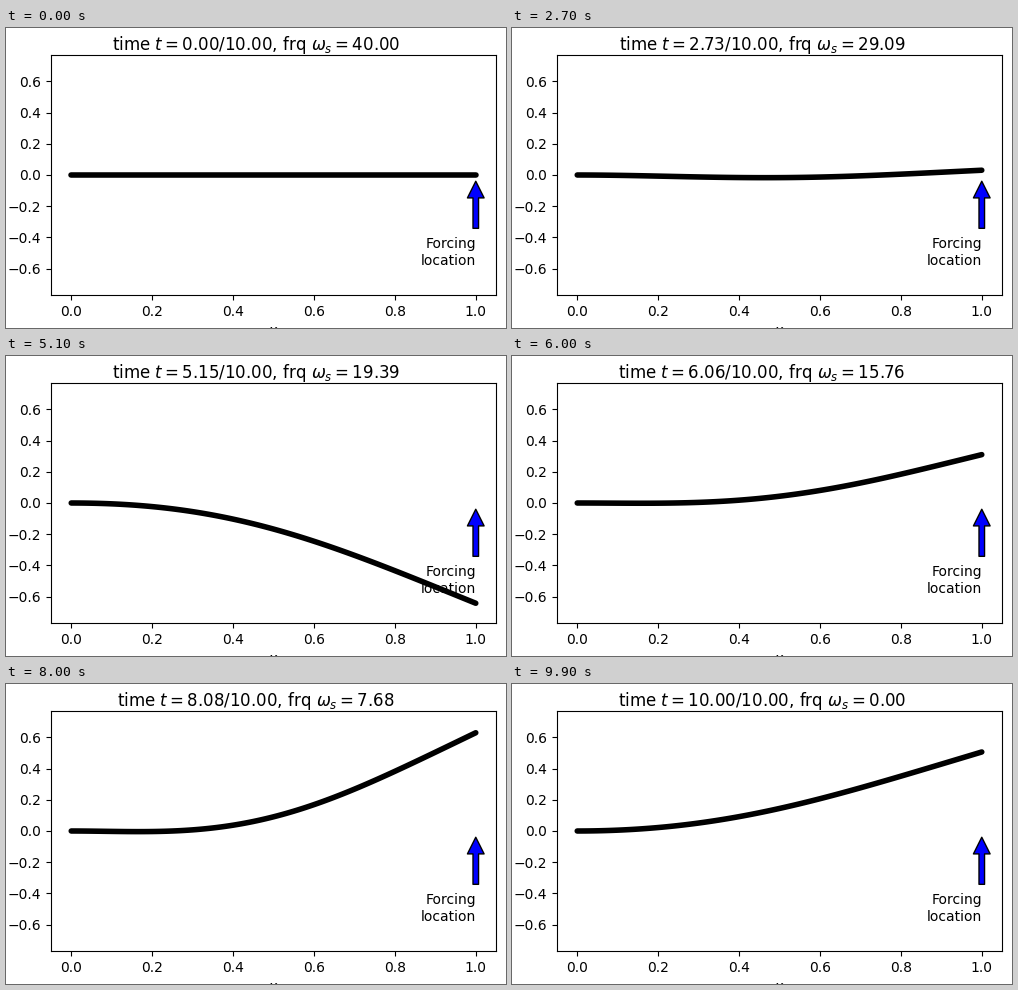
Animation, 500 px wide and 300 px high, one loop 10 s. Source, as a matplotlib script:

```python
"""Cantilever beam driven at its free end by a force of falling frequency."""
import numpy as np
import matplotlib.pyplot as plt
from matplotlib.animation import FuncAnimation

FRAMES, T = 100, 10.0
OMEGA_START = 40.0
SUBSTEPS = 400
# Roots of cos(b) cosh(b) = -1 for the clamped-free beam
BETAS = (1.8751040687, 4.6940911330, 7.8547574382, 10.9955407349, 14.1371683910)


def sweep(t):
    return OMEGA_START * (1 - t / T)


def mode_shape(b, x):
    """Clamped-free mode, scaled to 1 at the tip."""
    ratio = (np.cosh(b) + np.cos(b)) / (np.sinh(b) + np.sin(b))

    def raw(s):
        return np.cosh(b * s) - np.cos(b * s) - ratio * (np.sinh(b * s) - np.sin(b * s))

    return raw(x) / raw(1.0)


def cumulative(y, dt):
    return np.concatenate(([0.0], np.cumsum((y[1:] + y[:-1]) * dt / 2)))


def tip_motion(w, t, force):
    """Undamped modal response at the tip, starting from rest."""
    dt = t[1] - t[0]
    c = cumulative(force * np.cos(w * t), dt)
    s = cumulative(force * np.sin(w * t), dt)
    return 4 / w * (np.sin(w * t) * c - np.cos(w * t) * s)


x = np.linspace(0, 1, 101)
fine = np.linspace(0, T, (FRAMES - 1) * SUBSTEPS + 1)
force = np.sin(sweep(fine) * fine)
times = fine[::SUBSTEPS]
beam = sum(np.outer(tip_motion(b**2, fine, force)[::SUBSTEPS], mode_shape(b, x))
           for b in BETAS)

fig, ax = plt.subplots(figsize=(5, 3), dpi=100)
fig.subplots_adjust(left=0.09, right=0.98, bottom=0.11, top=0.91)
ax.set_xlim(-0.05, 1.05)
ax.set_ylim(-0.77, 0.77)
ax.set_xlabel("$x$")
line, = ax.plot(x, beam[0], "k", lw=4, solid_capstyle="round")
ax.annotate("Forcing\nlocation", xy=(1, 0), xytext=(1, -0.4), ha="right", va="top",
            arrowprops=dict(facecolor="blue", shrink=0.1))
title = fig.suptitle("")


def update(i):
    t = times[i]
    line.set_ydata(beam[i])
    title.set_text(rf"time $t={t:.2f}/{T:.2f}$, frq $\omega_s={abs(sweep(t)):.2f}$")
    return line, title


anim = FuncAnimation(fig, update, frames=FRAMES, interval=100, repeat=True)
plt.show()
```
